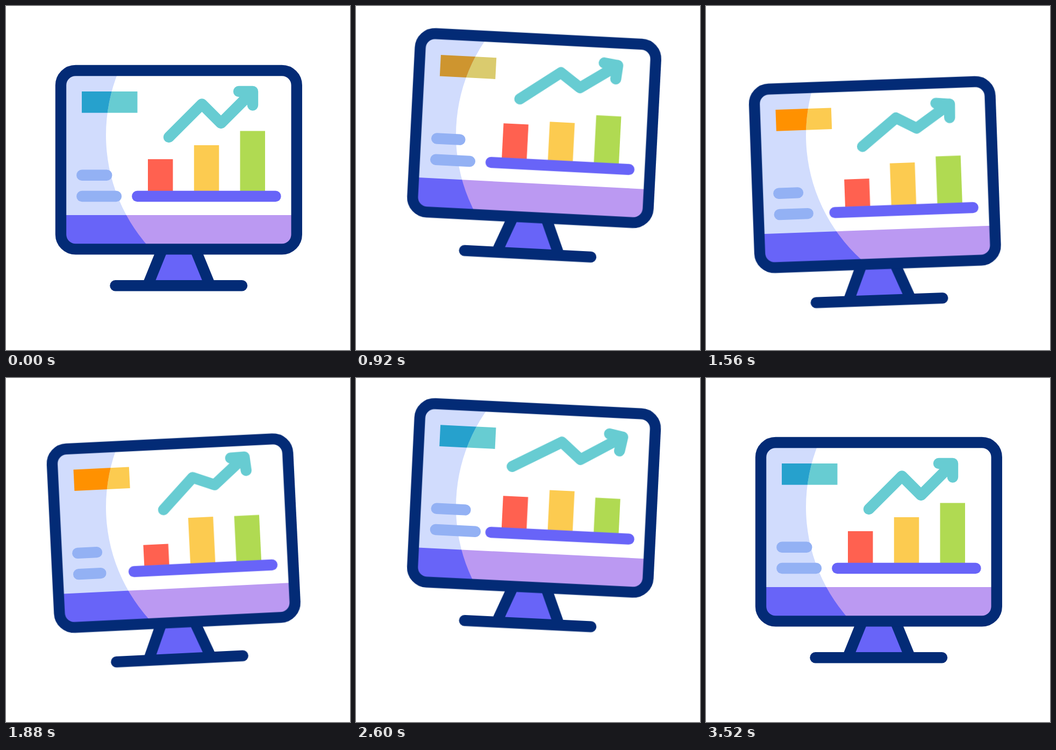
An HTML page for the animation above (3600 ms loop, 640x640 px).

```html
<!DOCTYPE html>
<html lang="en">
<head>
<meta charset="utf-8">
<title>Bouncing monitor</title>
<style>
  html, body { margin: 0; width: 100%; height: 100%; overflow: hidden; background: #fff; }
  svg { display: block; width: 100vw; height: 100vh; }

  .pose, .bar, .card, .pill, .arrow {
    animation: 3600ms cubic-bezier(.37, 0, .63, 1) infinite;
  }
  .pose { transform-origin: 321.3px 484px; animation-name: bounce, tilt; }
  .bar { transform-origin: 0 345px; }
  .red { fill: #ff6150; animation-name: red; }
  .yellow { fill: #fccb50; animation-name: yellow; }
  .green { fill: #b0da52; animation-name: green; }
  .card { animation-name: card; }
  .card.dim { animation-name: card-dim; }
  .pill { stroke: #93b1f4; }
  .short { animation-name: short; }
  .long { animation-name: long; }
  .arrow { stroke: #67ccd2; animation-name: arrow; }
  .line { fill: none; stroke-width: 20.4; stroke-linecap: round; stroke-linejoin: round; }
  .navy { stroke: #032b76; }

  @keyframes bounce {
    0%, 3.8% { translate: 0 0; }
    21.1% { translate: 0 -68px; }
    43.8% { translate: 0 27.5px; }
    68.3% { translate: 0 -68px; }
    91.4%, 100% { translate: 0 0; }
  }
  @keyframes tilt {
    0%, 8.9% { rotate: 0deg; }
    27.3% { rotate: 3deg; }
    49% { rotate: -3deg; }
    75.3% { rotate: 3deg; animation-timing-function: cubic-bezier(.35, 0, .5, 1); }
    97.8%, 100% { rotate: 0deg; }
  }

  @keyframes red {
    0%, 4.4%, 72.2%, 100% { transform: scaleY(1); }
    15% { transform: scaleY(1.12); }
    35% { transform: scaleY(1.05); }
    52.2% { transform: scaleY(.66); }
  }
  @keyframes yellow {
    0%, 4.4%, 52.2%, 84.4%, 100% { transform: scaleY(1); }
    15%, 35% { transform: scaleY(.84); }
    72.2% { transform: scaleY(.87); }
  }
  @keyframes green {
    0%, 4.4%, 84.4%, 100% { transform: scaleY(1); }
    15%, 52.2% { transform: scaleY(.757); }
    35% { transform: scaleY(.815); }
    72.2% { transform: scaleY(.577); }
  }

  @keyframes card {
    0%, 23.4%, 63.8%, 76.7%, 92.7%, 100% { fill: #67ccd2; }
    26.6%, 60.6%, 80%, 89.5% { fill: #fccb50; }
  }
  @keyframes card-dim {
    0%, 23.4%, 63.8%, 76.7%, 92.7%, 100% { fill: #26a1cd; }
    26.6%, 60.6%, 80%, 89.5% { fill: #ff9100; }
  }

  @keyframes short {
    0%, 4.4%, 84.4%, 100% { d: path("M141.3 314.7H187.3"); }
    15% { d: path("M141.3 314.7H193.5"); }
    35%, 52.2% { d: path("M141.3 314.7H177"); }
    72.2% { d: path("M141.3 314.7H195"); }
  }
  @keyframes long {
    0%, 4.4%, 15%, 35%, 84.4%, 100% { d: path("M141.3 354H205"); }
    52.2% { d: path("M141.3 354H182.5"); }
    72.2% { d: path("M141.3 354H215.5"); }
  }

  @keyframes arrow {
    0%, 4.4%, 84.4%, 100% { d: path("M303 244L364.5 182.5L400 218L459 159M433 159L459 159L459 184.5"); }
    15% { d: path("M287 243.5L365 181L403.5 209L472 154M446.2 152.6L472 154L470.6 179.5"); }
    35% { d: path("M296 225L366.5 180L402 205L469.7 168.3M444.5 163L469.7 168.3L466.3 193.5"); }
    52.2% { d: path("M304.8 241.8L361.8 184.5L402 200L459.5 151M434 151.7L459.5 151L461.8 176.2"); }
    72.2% { d: path("M278 229.7L368.3 180L404.3 210.5L480.8 165M456 160.2L480.8 165L476.1 191"); }
  }
</style>
</head>
<body>
<svg viewBox="0 0 640 640">
  <defs>
    <!-- everything left of a circle that stays fixed on the stage -->
    <clipPath id="shade">
      <path clip-rule="evenodd" d="M0 0H498.5V640H0ZM498.5 -72.5A312.5 312.5 0 0 0 498.5 552.5Z"/>
    </clipPath>
  </defs>

  <g class="pose">
    <path fill="#bb99f2" d="M106 389H537V446H106Z"/>
    <rect class="card" x="141" y="159" width="103.5" height="39.7"/>
  </g>

  <g clip-path="url(#shade)">
    <g class="pose">
      <path fill="#d1dcfd" d="M106 124H537V390H106Z"/>
      <path fill="#6864f8" d="M106 389H537V446H106Z"/>
      <rect class="card dim" x="141" y="159" width="103.5" height="39.7"/>
    </g>
  </g>

  <g class="pose">
    <path class="line pill short" d="M141.3 314.7H187.3"/>
    <path class="line pill long" d="M141.3 354H205"/>
    <rect class="bar red" x="264" y="285" width="46.5" height="60"/>
    <rect class="bar yellow" x="349.8" y="259" width="46.5" height="86"/>
    <rect class="bar green" x="435.5" y="232.5" width="46.5" height="112.5"/>
    <path class="line" stroke="#6864f8" d="M244.3 354H501.5"/>
    <path class="line arrow" d="M303 244L364.5 182.5L400 218L459 159M433 159L459 159L459 184.5"/>

    <path fill="#6864f8" d="M291 452H352L377 515H266Z"/>
    <path class="line navy" style="stroke-linecap:butt" d="M291 452L264.3 518M352 452L379 518"/>
    <path class="line navy" d="M203.5 520.3H439"/>
    <rect class="line navy" x="102" y="120" width="438.8" height="332.4" rx="27.5"/>
  </g>
</svg>
</body>
</html>
```
